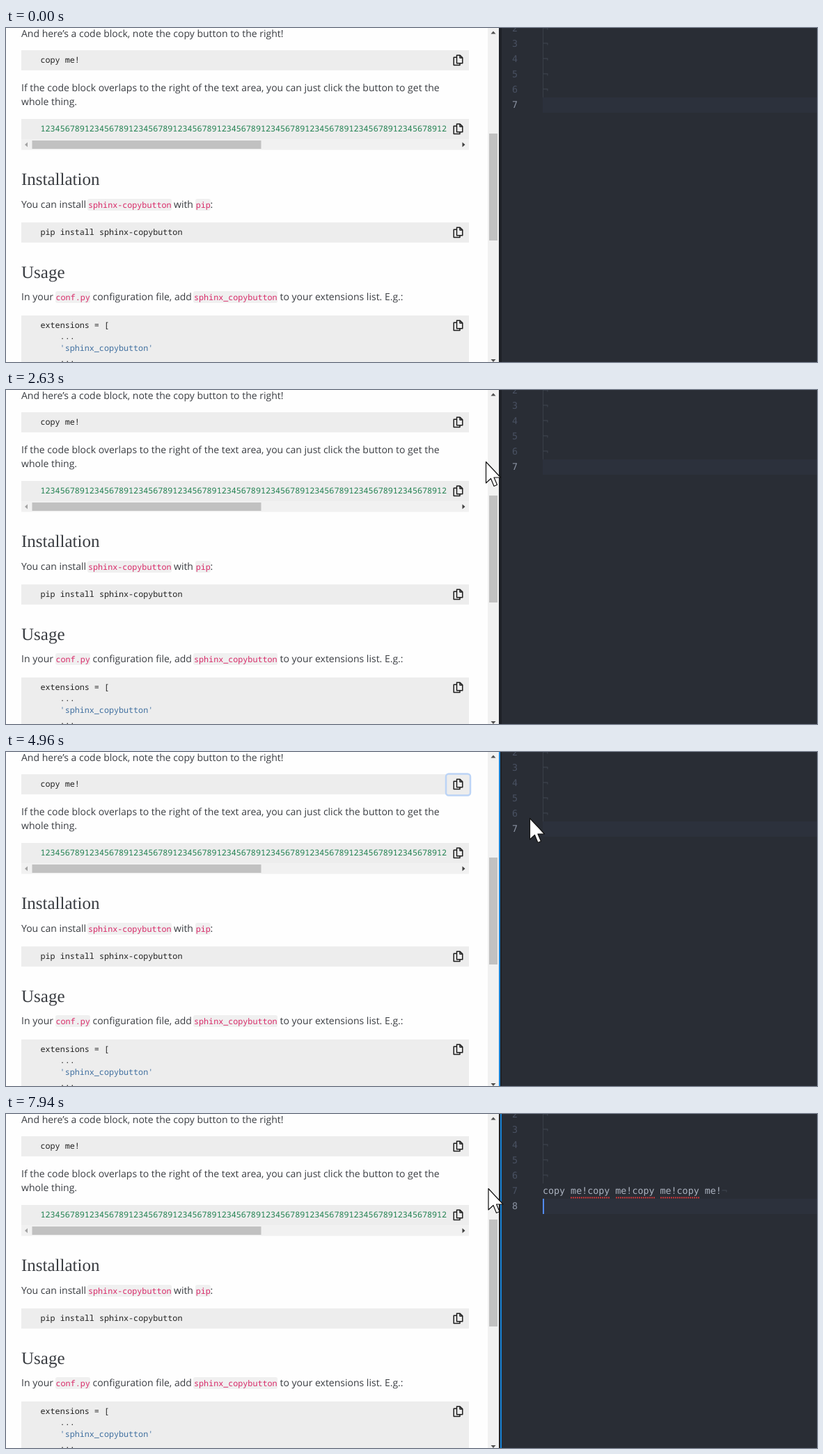
An HTML page for the animation above (8 s loop, 1165 px wide and 481 px high).

```html
<!DOCTYPE html>
<html lang="en">
<head>
<meta charset="utf-8">
<title>Copy button demo</title>
<style>
html, body { margin: 0; width: 100%; height: 100%; overflow: hidden; background: #fefefe; }
svg { display: block; width: 1165px; height: 481px; }
text { text-rendering: geometricPrecision; white-space: pre; }
.body { font: 14px "Open Sans", "Noto Sans", sans-serif; fill: #3a3d42; }
.head { font: 25px "Liberation Serif", "Noto Serif", serif; fill: #3a3d42; }
.code { font: 11.73px "Noto Sans Mono", "DejaVu Sans Mono", monospace; fill: #222; }
.pink { fill: #d82a68; }
.num { fill: #208050; }
.str { fill: #4070a0; }
.edit { font: 13.33px "DejaVu Sans Mono", monospace; fill: #abb2bf; }
.dim { fill: #495162; }
.lit { fill: #8b93a3; }
.mark { fill: #3f454f; }
.block { fill: #ededed; }
.chip { fill: #f0f0f0; }
.track { fill: #f1f1f1; }
.thumb { fill: #c1c1c1; }
.active { fill: #1883d7; }
.spell { stroke: #d0383b; stroke-width: 2; stroke-dasharray: 2 1; }
.icon { fill: none; stroke: #1d1d1d; stroke-width: 1.5; stroke-linejoin: round; }
.pointer { fill: #fff; stroke: #111; stroke-width: 1.2; stroke-linejoin: round; }
</style>
</head>
<body>
<svg viewBox="0 0 1165 481" xmlns="http://www.w3.org/2000/svg">
  <defs>
    <g id="copy" class="icon">
      <path d="M-1.5-6.7h4.7l3.6 3.6v7.8h-8.3zM3-6.7v3.8h3.8"/>
      <path d="M-1.7-3.8h-4.1v11.3h8.8v-2.6"/>
    </g>
  </defs>

  <!-- documentation page -->
  <rect width="708" height="481" fill="#fefefe"/>
  <g class="block">
    <rect x="22" y="32" width="643" height="29"/>
    <rect x="22" y="131" width="643" height="29"/>
    <rect x="22" y="280" width="643" height="29"/>
    <rect x="22" y="414" width="643" height="67"/>
  </g>
  <g class="chip">
    <rect x="117" y="246" width="121" height="17" rx="3"/>
    <rect x="272" y="246" width="22" height="17" rx="3"/>
    <rect x="71" y="379" width="50" height="17" rx="3"/>
    <rect x="269" y="379" width="121" height="17" rx="3"/>
  </g>
  <g class="body">
    <text x="22" y="13">And here’s a code block, note the copy button to the right!</text>
    <text x="22" y="91">If the code block overlaps to the right of the text area, you can just click the button to get the</text>
    <text x="22" y="111">whole thing.</text>
    <text x="22" y="259">You can install</text>
    <text x="241" y="259">with</text>
    <text x="293.5" y="259">:</text>
    <text x="22" y="392">In your</text>
    <text x="124.5" y="392">configuration file, add</text>
    <text x="393.5" y="392">to your extensions list. E.g.:</text>
  </g>
  <g class="head">
    <text x="22" y="226">Installation</text>
    <text x="22" y="360">Usage</text>
  </g>
  <g class="code">
    <text x="49.5" y="50">copy me!</text>
    <text x="49.5" y="149" class="num" id="digits"></text>
    <text x="49.5" y="298">pip install sphinx-copybutton</text>
    <text x="49.5" y="431.5">extensions = [</text>
    <text x="77.6" y="448">...</text>
    <text x="77.6" y="464.5" class="str">'sphinx_copybutton'</text>
    <text x="77.6" y="481">...</text>
    <g class="pink">
      <text x="118" y="258.5">sphinx-copybutton</text>
      <text x="272.8" y="258.5">pip</text>
      <text x="71.5" y="391.5">conf.py</text>
      <text x="270" y="391.5">sphinx_copybutton</text>
    </g>
  </g>

  <!-- scrollbars -->
  <rect class="track" x="22" y="160" width="643" height="15.5"/>
  <rect class="thumb" x="37.5" y="162" width="329" height="12"/>
  <path d="M31 164.500v7l-4-3.500z" fill="#a3a3a3"/>
  <path d="M655.500 164.500v7l4-3.500z" fill="#404040"/>
  <rect class="track" x="692" width="16" height="481"/>
  <rect class="thumb" x="694" y="152" width="12" height="154"/>
  <path d="M696.500 8.500h7l-3.500-4zM696.500 477h7l-3.500 4z" fill="#505050"/>

  <rect id="ring" x="632" y="31.500" width="35" height="31" rx="4" fill="#ededed" stroke="#bcd4f6" stroke-width="2.500"/>
  <use href="#copy" x="649" y="46"/>
  <use href="#copy" x="649" y="145"/>
  <use href="#copy" x="649" y="294"/>
  <use href="#copy" x="649" y="428"/>

  <!-- editor -->
  <rect x="708" width="457" height="481" fill="#292d35"/>
  <rect x="708" width="4" height="481" fill="#1e2127"/>
  <rect id="pageActive" class="active" x="708" width="2" height="481"/>
  <rect id="editActive" class="active" x="710" width="2" height="481"/>
  <rect id="band" x="771" y="100" width="394" height="22" fill="#2c313c"/>
  <path d="M771.500 0V100" stroke="#3a3f48"/>
  <g class="edit">
    <g id="rows"></g>
    <text id="seven" x="727" y="115">7</text>
    <text id="eight" class="lit" x="727" y="137">8</text>
    <text id="typed" x="771" y="115"></text>
    <text id="eol" class="mark" x="1028" y="115">¬</text>
  </g>
  <path id="spell" class="spell" d="M811 120.500h57M876 120.500h56M940 120.500h56"/>
  <rect id="caret" width="2" height="22" fill="#528bff"/>

  <!-- pointers, each with its hot spot at 0,0 -->
  <g id="pointer">
    <path id="arrow" class="pointer" d="M.5.5V31l7-6.500 4.500 11 4.500-2-4.500-10.500h9.500z"/>
    <path id="resize" class="pointer" d="M-20 0l11.500-8v6h17v-6L20 0 8.500 8V2h-17v6z"/>
    <path id="beam" d="M-8.500-14.500h6.500l2 1.500 2-1.500h6.500M0-13.500v27M-8.500 14.500h6.500l2-1.500 2 1.500h6.500" fill="none" stroke="#e6e3da" stroke-width="2.300"/>
    <g id="hand" class="pointer">
      <path d="M-3 3.500Q-3 .6 0 .6T3 3.500V12Q7 10.500 8 13.500 11.500 12 12.500 15.200 16 14.500 16 18.500V28Q16 32 12.500 36V41H-6.500V37Q-7 34-10 30L-13.500 25.500Q-15 22-12 21.200-9.500 20.800-7 23.500L-3 27z"/>
      <path d="M3 11v8M8 13v6.500M12.500 15v5" fill="none"/>
    </g>
  </g>
</svg>
<script>
const LOOP = 8000;
const CHAR = 8.025;
const $ = id => document.getElementById(id);
const show = (id, on) => $(id).style.display = on ? "" : "none";

// Each move: start time, tick length, way points as [tick, x, y].
const moves = [
  [920, 77, [[0, 1024, 486], [7, 961.5, 416.5], [10, 874.5, 379.5]]],
  [1770, 77, [[0, 852, 358], [7, 708, 187], [10, 694, 109]]],
  [2630, 73, [[0, 689, 103], [6, 648, 46]]],
  [3550, 82, [[0, 648, 46], [5, 634, 47]]],
  [4400, 80, [[0, 642, 51], [7, 752, 95], [9, 799, 117]]],
  [7870, 70, [[0, 738, 110], [1, 692.5, 107]]]
];

// Times at which the caret shows and hides in turn.
const blinks = [5300, 5710, 5990, 6250, 6400, 7320, 7700];
const pastes = [5990, 6400, 6620, 6620];
const times = { click: 3550, focus: 5300, newline: 6940, spell: 7090 };

$("digits").textContent = "123456789".repeat(9) + "12";
$("rows").innerHTML = [2, 3, 4, 5, 6].map(n => {
  const y = 22 * n - 39;
  return `<text class="dim" x="727" y="${y}">${n}</text><text class="mark" x="771" y="${y}">¬</text>`;
}).join("");

function pointerAt(t) {
  const move = moves.filter(m => m[0] <= t).pop();
  if (!move) return null;
  const [start, tick, points] = move;
  const last = points[points.length - 1];
  const n = Math.min(Math.floor((t - start) / tick), last[0]);
  const i = points.findIndex(p => p[0] >= n);
  const b = points[i], a = points[Math.max(i - 1, 0)];
  const k = a === b ? 0 : (n - a[0]) / (b[0] - a[0]);
  return [a[1] + (b[1] - a[1]) * k, a[2] + (b[2] - a[2]) * k];
}

function shapeAt(x, y) {
  if (x < 668 && y < 66) return "hand";
  if (x > 703 && x < 715) return "resize";
  return x < 771 ? "arrow" : "beam";
}

function render(t) {
  const pos = pointerAt(t);
  show("pointer", pos);
  if (pos) {
    $("pointer").setAttribute("transform", `translate(${pos})`);
    const shape = shapeAt(...pos);
    for (const id of ["arrow", "resize", "beam", "hand"]) show(id, id === shape);
  }

  const onPage = t >= times.click && t < times.focus;
  show("ring", onPage);
  show("pageActive", onPage);
  show("editActive", t >= times.focus);

  const typed = "copy me!".repeat(pastes.filter(p => p <= t).length);
  const second = t >= times.newline;
  $("typed").textContent = typed;
  $("band").setAttribute("y", second ? 122 : 100);
  $("seven").setAttribute("class", second ? "dim" : "lit");
  show("eight", second);
  show("eol", second);
  show("spell", t >= times.spell);

  $("caret").setAttribute("x", 771 + (second ? 0 : typed.length * CHAR));
  $("caret").setAttribute("y", second ? 122 : 100);
  show("caret", blinks.filter(b => b <= t).length % 2);
}

const origin = performance.now();
function frame() {
  render((performance.now() - origin) % LOOP);
  requestAnimationFrame(frame);
}
frame();
</script>
</body>
</html>
```
